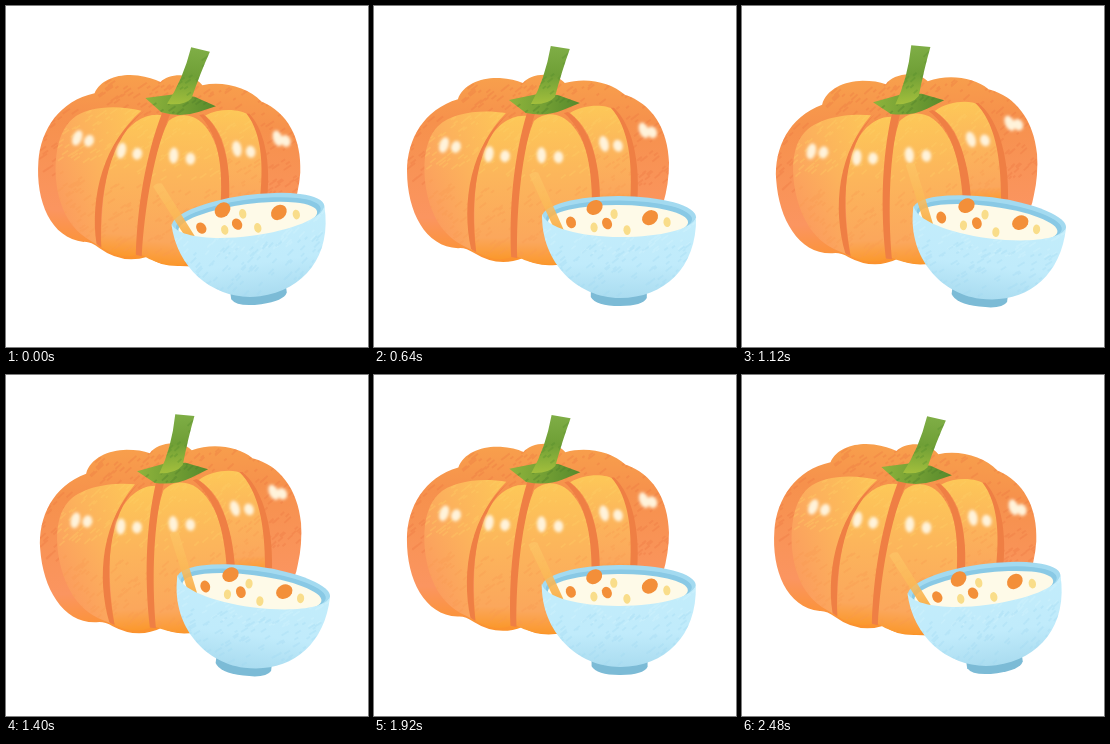
An HTML page for the animation above (2520 ms loop, 362x341 px).

```html
<!DOCTYPE html>
<html lang="en">
<head>
<meta charset="utf-8">
<title>Pumpkin and soup</title>
<style>
  html, body { margin: 0; width: 100%; height: 100%; overflow: hidden; background: #fff; }
  svg { display: block; width: 100vw; height: 100vh; }
</style>
</head>
<body>
<svg viewBox="0 0 362 341">
  <defs>
    <linearGradient id="skin" x1="0" x2="0" y1="0" y2="1">
      <stop offset="0" stop-color="#f8a04c"/><stop offset=".25" stop-color="#f6914c"/>
      <stop offset=".75" stop-color="#fb9560"/><stop offset="1" stop-color="#fb9228"/>
    </linearGradient>
    <linearGradient id="panel" x1="0" x2="0" y1="0" y2="1">
      <stop offset="0" stop-color="#fdc858"/><stop offset=".4" stop-color="#fcb65b"/>
      <stop offset=".85" stop-color="#fba75c"/><stop offset="1" stop-color="#fb982c"/>
    </linearGradient>
    <linearGradient id="side" x1="1" x2="0" y1="0" y2=".8">
      <stop offset="0" stop-color="#fdc758"/><stop offset=".5" stop-color="#fcb25c"/>
      <stop offset="1" stop-color="#fb995e"/>
    </linearGradient>
    <linearGradient id="green">
      <stop offset="0" stop-color="#8fb43c"/><stop offset="1" stop-color="#578a2c"/>
    </linearGradient>
    <linearGradient id="stem" x1="0" x2="0" y1="0" y2="1">
      <stop offset="0" stop-color="#7fae46"/><stop offset=".5" stop-color="#6f9f36"/>
      <stop offset="1" stop-color="#a3bf3c"/>
    </linearGradient>
    <linearGradient id="bowl" x1="0" x2="0" y1="0" y2="1">
      <stop offset="0" stop-color="#c3edfb"/><stop offset=".6" stop-color="#c0ebfb"/>
      <stop offset="1" stop-color="#aadcf0"/>
    </linearGradient>
    <linearGradient id="spoon" x1="0" x2="0" y1="0" y2="1">
      <stop offset="0" stop-color="#fdc869" stop-opacity=".6"/><stop offset="1" stop-color="#f9ae48"/>
    </linearGradient>
    <filter id="soft"><feGaussianBlur stdDeviation="1.4"/></filter>
  </defs>

  <g id="pumpkin">
    <path id="body" fill="url(#skin)" d="M33 165C33 133 50 103 84 93C89 78 108 71 126 72Q140 73 149 77C156 68 179 64 191 77C212 71 237 76 251 89C278 98 294 123 295 157Q295 178 289 198C280 238 232 259 182 259Q162 261 149 252Q124 262 100 247Q91 241 84 242C51 241 33 205 33 165Z"/>
    <path id="left" fill="url(#side)" d="M132 107C108 103 78 106 64 120C47 136 47 176 58 204Q68 230 92 241L98 244C90 198 96 143 132 107Z"/>
    <path id="midLeft" fill="url(#panel)" d="M154 110C136 108 122 120 112 138C99 168 99 207 102 246Q121 257 138 251C136 204 139 155 154 110Z"/>
    <path id="middle" fill="url(#panel)" d="M160 115C172 104 188 107 199 120C216 140 221 178 218 215L185 258Q161 261 142 250C142 202 146 148 160 115Z"/>
    <path id="right" fill="url(#panel)" d="M196 107C210 98 232 98 240 104C257 120 261 161 257 202L225 202C225 158 221 126 196 107Z"/>
    <g fill="#ef7f44">
      <path d="M136 106C96 138 87 198 97 243L102 246C96 194 101 138 136 106Z"/>
      <path d="M153 107C139 153 135 205 137 251L143 252C142 202 148 145 161 108Z"/>
      <path d="M190 107C211 125 218 157 218 200H226C227 154 215 121 194 106Z"/>
      <path d="M237 102C255 122 259 157 256 200H263C267 155 258 119 240 102Z"/>
    </g>
    <g id="shines" fill="#fff3da" filter="url(#soft)"></g>
    <path id="leaf" fill="url(#green)" d="M135 94L164 88L184 89L206 97L189 104Q172 111 152 107Z"/>
    <path id="stalk" fill="url(#stem)" d="M177 40L196 43Q188 65 181 91Q174 99 157 98Q171 74 177 40Z"/>
  </g>

  <g id="dish">
    <path fill="#7cbbd6" d="M217 284H273V292Q269 300 246 300Q222 300 217 291Z"/>
    <ellipse cx="245" cy="211" rx="77" ry="21" fill="#a3daf0"/>
    <ellipse cx="245" cy="213" rx="73" ry="18.5" fill="#89c9e5"/>
    <ellipse cx="244" cy="216" rx="70" ry="17" fill="#fefae8"/>
    <g id="bits"></g>
    <path fill="url(#spoon)" d="M155 169Q159 165 164 167L191 227L181 225Z"/>
    <path id="cup" fill="url(#bowl)" d="M168 208C171 222 207 231 246 231C286 231 319 223 322 211C323 262 290 292 246 292C204 292 167 257 168 208Z"/>
  </g>
</svg>
<script>
const $ = id => document.getElementById(id);
let seed = 7;
const random = () => (seed = seed * 16807 % 2147483647) / 2147483647;

// Covers the band from..to of a shape's height with slanted brush strokes.
function grain(id, color, from = 0, to = 1) {
  const { x, y, width, height } = $(id).getBBox();
  const count = width * height * (to - from) / 70;
  let d = '';
  for (let i = 0; i < count; i++) {
    const size = 2 + 5 * random();
    const top = y + height * (from + (to - from) * random());
    d += `M${x + width * random()} ${top}l${size} ${-.8 * size}`;
  }
  $(id).insertAdjacentHTML('afterend',
    `<clipPath id="in-${id}"><use href="#${id}"/></clipPath>
     <path d="${d}" clip-path="url(#in-${id})" stroke="${color}" stroke-width="1.8" opacity=".3"/>`);
}

const ellipse = (x, y, rx, ry, turn, fill = 'inherit') =>
  `<ellipse rx="${rx}" ry="${ry}" fill="${fill}" transform="translate(${x} ${y}) rotate(${turn})"/>`;

grain('body', '#ec7440', .05, .6);
for (const id of ['left', 'midLeft', 'middle', 'right']) {
  grain(id, '#fdd067', 0, .45);
  grain(id, '#f99a50', .5, 1);
}
grain('leaf', '#47772a');
grain('stalk', '#4f8a2c', .2, .9);
grain('cup', '#9ed8f1', .4, 1);
grain('cup', '#d8f6fe', .1, .5);

// Pairs of highlights follow the curve of the skin and close up at its sides.
for (const x of [76, 123, 176, 237, 274]) {
  const y = 151 - .0018 * (x - 155) ** 2;
  const gap = 8.5 * Math.sqrt(1 - ((x - 165) / 125) ** 2);
  const turn = (165 - x) / 5;
  $('shines').innerHTML += ellipse(x - gap, y - 1, 4.6, 8, turn) + ellipse(x + gap, y + 1, 4.8, 6, turn);
}

function addBits(points, rx, ry, turn, fill) {
  $('bits').innerHTML += points.map(([x, y]) => ellipse(x, y, rx, ry, turn, fill)).join('');
}
addBits([[220.5, 201.5], [276, 211.5]], 8.5, 7, -35, '#f38f39');
addBits([[197, 216.5], [233, 217.5]], 4.8, 6, -25, '#f38f39');
addBits([[240, 208], [293, 216], [220, 221.5], [253, 224]], 3.6, 4.9, -5, '#f9dd8a');

const LOOP = 2520, STEP = 40;
function draw(now) {
  const time = Math.floor(now % LOOP / STEP) * STEP;
  const sway = Math.cos(2 * Math.PI * time / LOOP);
  $('pumpkin').setAttribute('transform', `rotate(${4.2 * sway} 164 152)`);
  $('dish').setAttribute('transform', `rotate(${-7.8 * sway} 237 232)`);
}
let start;
function tick(now) {
  start ??= now;
  draw(now - start);
  requestAnimationFrame(tick);
}
draw(0);
requestAnimationFrame(tick);
</script>
</body>
</html>
```
